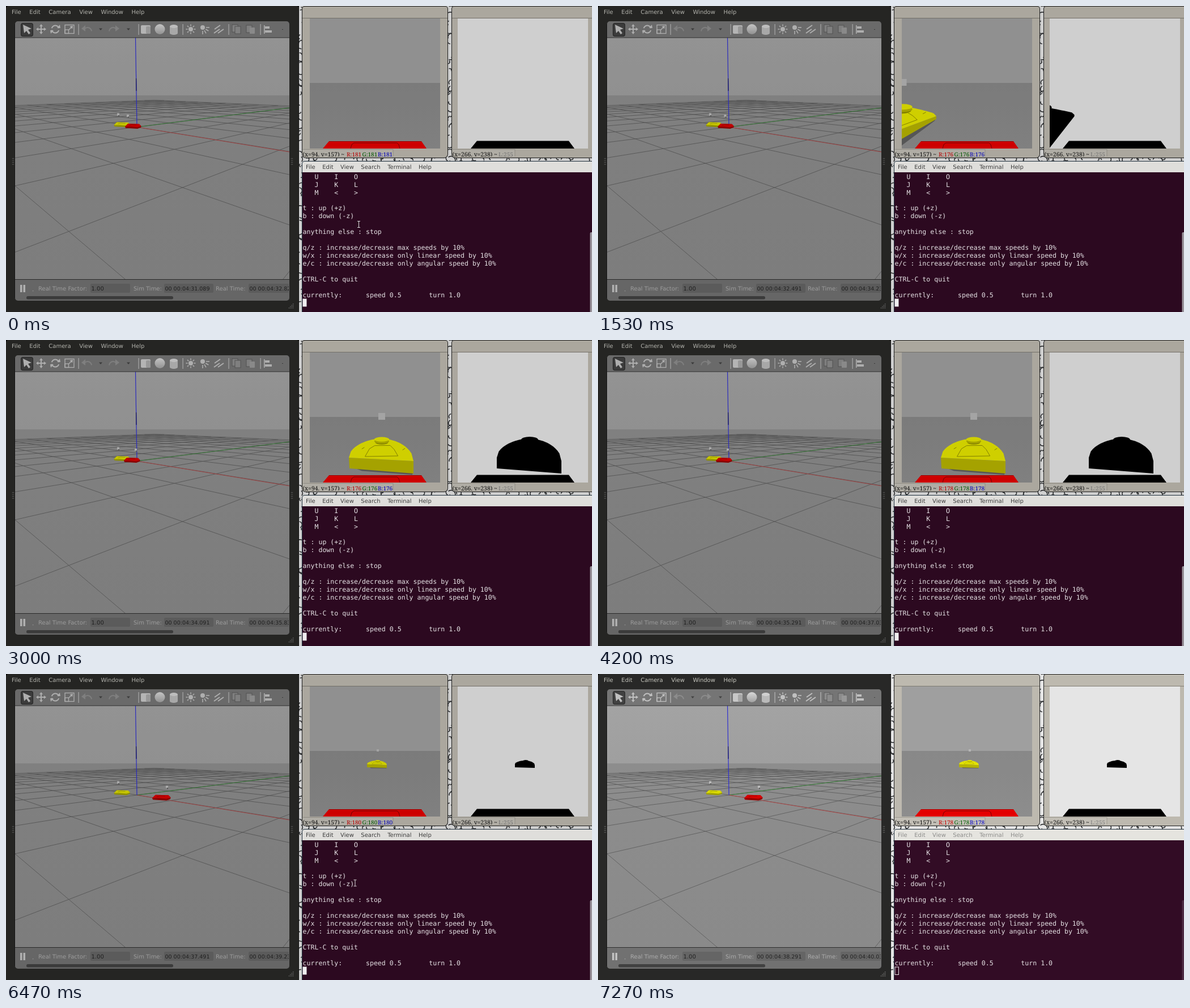
An HTML page with a canvas that plays this animation: 1034 px wide and 541 px high, repeating every 7.34 s.

```html
<!DOCTYPE html>
<html>
<head>
<meta charset="utf-8">
<style>
html, body { margin: 0; width: 100%; height: 100%; overflow: hidden; background: #000; }
canvas { display: block; }
</style>
</head>
<body>
<canvas id="stage" width="1034" height="541"></canvas>
<script>
const g = document.getElementById('stage').getContext('2d');
const LOOP = 7340, TURN_END = 2800, DRIVE_START = 4447, DRIVE_TIME = 1823, FOCUS_LOST = 6670;
const SANS = '"DejaVu Sans", sans-serif', MONO = '"DejaVu Sans Mono", monospace', SERIF = '"Noto Serif", serif';
const clamp = v => Math.max(0, Math.min(1, v));
const mix = (a, b, p) => a + (b - a) * p;
const driven = t => clamp((t - DRIVE_START) / DRIVE_TIME);

function rect(color, x, y, w, h, r = 0) {
  g.fillStyle = color;
  g.beginPath();
  g.roundRect(x, y, w, h, r);
  g.fill();
}
function trace(points) {
  g.beginPath();
  for (const [x, y] of points) g.lineTo(x, y);
}
function poly(color, points) {
  trace(points);
  g.fillStyle = color;
  g.fill();
}
function line(color, width, ...points) {
  trace(points);
  g.strokeStyle = color;
  g.lineWidth = width;
  g.stroke();
}
function disc(color, x, y, rx, ry = rx) {
  g.fillStyle = color;
  g.beginPath();
  g.ellipse(x, y, rx, ry, 0, 0, 7);
  g.fill();
}
function arc(color, width, x, y, r, a, b) {
  g.strokeStyle = color;
  g.lineWidth = width;
  g.beginPath();
  g.arc(x, y, r, a, b);
  g.stroke();
}
function frame(color, width, x, y, w, h) {
  g.strokeStyle = color;
  g.lineWidth = width;
  g.strokeRect(x, y, w, h);
}
function text(str, x, y, color, size = 10, family = SANS) {
  g.textRendering = 'geometricPrecision';
  g.font = size + 'px ' + family;
  g.fillStyle = color;
  g.fillText(str, x, y);
  return x + g.measureText(str).width;
}
function menu(items, x, y, gap, color) {
  for (const item of items.split(' ')) x = text(item, x, y, color) + gap;
}
function clipped(x, y, w, h, draw) {
  g.save();
  g.beginPath();
  g.rect(x, y, w, h);
  g.clip();
  draw();
  g.restore();
}
function shade(y0, y1, from, to) {
  const fill = g.createLinearGradient(0, y0, 0, y1);
  fill.addColorStop(0, from);
  fill.addColorStop(1, to);
  return fill;
}

function wallpaper() {
  rect('#fff', 517, 0, 517, 541);
  let seed = 7;
  const rnd = () => (seed = seed * 16807 % 2147483647) / 2147483647;
  const doodle = (x, y) => {
    const a = rnd() * 6;
    arc('#3a3c3e', 1.6, x + rnd() * 8 - 4, y + rnd() * 6 - 3, 3 + rnd() * 5, a, a + 1.5 + rnd());
  };
  for (let y = 0; y < 541; y += 9) { doodle(520, y); doodle(783, y); }
  for (let x = 524; x < 1034; x += 9) doodle(x, 271);
}

// Ground grid: two families of lines, each through its own vanishing point
const HORIZON = 147, VX = -185, VY = 761;
const kx = y => 6.21 + 1.678 * y, ky = x => -7.91 + 1.775 * x;
function ground(x, y) {
  const d = (VY - VX) / (kx(y) - ky(x));
  return [VX + d * kx(y), HORIZON + d];
}

function scene(t) {
  rect(shade(56, 158, '#b5b5b5', '#b1b1b1'), 16, 56, 484, 103);
  rect(shade(158, 483, '#9d9d9d', '#9a9a9a'), 16, 158, 484, 325);
  for (let n = -10; n <= 10; n++) {
    const maxX = Math.min(10, (13.2 + 1.678 * n) / 1.775), minY = Math.max(-10, (1.775 * n - 13.2) / 1.678);
    if (maxX > -10) line('#626262', .8, ground(-10, n), ground(maxX, n));
    if (minY < 10) line('#626262', .8, ground(n, 10), ground(n, minY));
  }
  line('#3c8c3c', 1, [231, 214], [500, 180]);
  line('#c25050', 1, [231, 214], [500, 258]);
  line('#3434e8', 1.2, [231, 214], [228.5, 56]);
  line('#1c1c70', 1.2, [230, 150], [229.6, 128]);

  post(198, 192);
  robot(204.5, 209.5, 1, '#f4f400', '#b0b000');
  const spin = clamp(t / 2270), drive = driven(t);
  post(215 + 14 * spin + 55 * drive, 194.5 + 5.5 * drive);
  robot(224 - 2 * spin + 3 * Math.sin(Math.PI * spin) + 52 * drive, 212.2 + 6 * drive, 1 + .14 * drive, '#f00000', '#a80000');
}
function post(x, y) {
  rect('#d2d2d2', x - 2, y - 2.5, 4, 4);
  rect('#6e6e6e', x, y + 1, 2, 2.5);
}
function robot(x, y, s, top, side) {
  const at = pts => pts.map(([a, b]) => [x + a * s, y + b * s]);
  const rim = [[-14, 1], [-9, -4], [11, -3.5], [14.5, 0]];
  poly(side, at([...rim, [14, 2.5], [8, 4.8], [-13, 3.5]]));
  poly(top, at([...rim, [8, 2], [-3, 1]]));
  line(side, .8, ...at([[-7, -1], [-2, -2.5], [6, -2]]));
}

function toolbar() {
  const ink = '#d6d6d6', dim = '#9c9c9c', dark = '#484848';
  rect('#828282', 16, 27, 484, 32, [5, 5, 0, 0]);
  rect('#2c2c2c', 26, 30, 22, 24, 4);
  rect(dark, 27, 31, 20, 22, 3);
  poly(ink, [[30, 33], [45, 40], [39, 42], [43, 48], [40, 50], [36, 44], [32, 48]]);

  // Move, rotate, scale
  for (let i = 0; i < 4; i++) {
    const c = [1, 0, -1, 0][i], s = [0, 1, 0, -1][i];
    line(ink, 2, [62, 41], [62 + c * 7, 41 + s * 7]);
    poly(ink, [[62 + c * 9, 41 + s * 9], [62 + c * 5 - s * 3, 41 + s * 5 + c * 3], [62 + c * 5 + s * 3, 41 + s * 5 - c * 3]]);
  }
  for (const d of [1, -1]) {
    arc(ink, 2, 87, 41, 6.5, d > 0 ? .3 : 3.4, d > 0 ? 2.9 : 6);
    poly(ink, [[87 - d * 3, 41 + d * 2], [87 - d * 9, 41 + d * 2], [87 - d * 8, 41 + d * 8]]);
  }
  frame(ink, 1.3, 104, 33.5, 16, 15);
  frame(ink, 1.3, 104, 42, 6.5, 6.5);
  line(ink, 1.5, [111, 42], [117, 36]);
  poly(ink, [[118, 35], [112.5, 36], [117, 40.5]]);

  for (const x of [128, 234, 312, 393, 449]) rect('#cfcfcf', x - .5, 32, 1.2, 19);

  // Undo and redo
  for (const [x, d] of [[142, 1], [191, -1]]) {
    arc(dim, 2, x + d * 2, 45, 7, d > 0 ? 3.9 : 3.2, d > 0 ? 6.2 : 5.5);
    poly(dim, [[x - d * 9, 40], [x - d * 2, 34], [x - d * 2, 45]]);
    poly(dark, [[x + 22, 39.5], [x + 28, 39.5], [x + 25, 43]]);
  }

  // Box, ball, cylinder
  rect('#dedede', 238, 34, 17, 15, 2);
  rect('#bbb', 247, 36, 8, 13, 2);
  disc(shade(33, 50, '#ededed', '#b4b4b4'), 271.5, 41, 9);
  rect('#cfcfcf', 289, 36, 14, 12);
  disc('#cfcfcf', 296, 48, 7, 3);
  disc('#e8e8e8', 296, 36, 7, 3);

  // Lights
  const ray = (x, y, a, r0, r1) => line(ink, 1.6,
    [x + r0 * Math.cos(a), y + r0 * Math.sin(a)], [x + r1 * Math.cos(a), y + r1 * Math.sin(a)]);
  disc(ink, 326, 41, 4);
  for (let i = 0; i < 8; i++) ray(326, 41, i * Math.PI / 4, 5.5, 8.5);
  disc(ink, 347, 38, 4);
  for (let i = 0; i < 4; i++) ray(347, 38, i * Math.PI / 6, 6, 12);
  for (const [x, y] of [[368, 41], [367, 48], [374, 48]]) line(ink, 2, [x, y], [x + 10, y - 7]);

  // Copy, paste, align
  for (const [x, y] of [[399, 33], [404, 36], [424, 34]]) {
    rect(dim, x, y, 10, 13, 1);
    frame('#666', 1, x, y, 10, 13);
  }
  rect('#a8a8a8', 430, 38, 9, 11, 1);
  rect(ink, 455, 34, 1.6, 15);
  rect(ink, 457, 36, 8, 4);
  rect(ink, 457, 43, 12, 4);
  rect(dark, 487, 41, 2, 1);
}

function simulator(t) {
  rect('#2d2d2b', 0, 0, 517, 541, [5, 5, 0, 0]);
  line('#151515', 1, [516.5, 4], [516.5, 541]);
  menu('File Edit Camera View Window Help', 10, 13.5, 14.6, '#dcdcd4');
  toolbar();
  clipped(16, 56, 484, 427, () => scene(t));
  line('#3a3a3a', 1, [16, 56], [500, 56]);

  rect('#7e7e7e', 16, 484, 484, 37, [0, 0, 5, 5]);
  line('#333', 1, [16, 483.5], [500, 483.5]);
  line('#1a1a1a', 1, [15.5, 32], [15.5, 516]);
  rect('#d8d8d8', 25, 493, 3.5, 13);
  rect('#d8d8d8', 30.5, 493, 3.5, 13);
  rect('#c0c0c0', 47, 503, 1.2, 1.2);
  const step = Math.floor(t / 200), now = 31.089 + step * .2 + (step ? .002 : 0);
  const clock = s => '00 00:04:' + s.toFixed(3);
  const field = (label, x, value, boxX, boxW, size) => {
    text(label, x, 503, '#c0c0c0');
    rect('#707070', boxX, 491, boxW, 16, 2);
    clipped(boxX, 491, boxW, 16, () => text(value, boxX + 1.5, 503, '#262626', size));
  };
  field('Real Time Factor:', 57, '1.00', 149, 70, 10);
  field('Sim Time:', 225, clock(now), 279, 87, 9.5);
  field('Real Time:', 370, clock(now + 1.74), 428, 71, 9.5);
  rect('#484848', 36, 513, 259, 5.5, 2.5);

  // Splitter handles and resize grip
  for (let i = 0; i < 4; i++) {
    for (const x of [11, 13, 503, 505]) rect('#8a8a8a', x, 269 + i * 3.4, 1, 1.2);
    for (let j = 0; j <= i; j++) rect('#8a8a8a', 506 - j * 2.4, 526 + i * 2.4, 1.3, 1.3);
  }
}

// Yellow robot as the camera sees it:
// left, right, top, edge left/right, bottom left/right, lid x, post size
const NEAR = [605, 719, 174.5, 208, 214, 227, 236, 663, 12];
const FAR = [637, 672, 153, 159.5, 161, 165, 166, 656, 4];
const TURN = [-62, -51, 1, 16, -8, 22, -15, -52, 0];
function pose(t) {
  const turn = Math.max(0, (TURN_END - t) / 530);
  // Apparent width shrinks as one over the distance
  const width = 1 / mix(1 / 114, 1 / 35, driven(t)), near = (width - 35) / 79;
  return NEAR.map((v, i) => mix(FAR[i], v, near) + TURN[i] * turn);
}
function yellow(t, solid) {
  const [l, r, top, el, er, bl, br, lid, size] = pose(t), w = r - l;
  const dome = [];
  for (let i = 0; i <= 32; i++) {
    const u = i / 32, e = mix(el, er, u);
    dome.push([l + w * u, e - (e - top) * Math.pow(Math.sin(Math.PI * u), .47)]);
  }
  const lidY = top + w * .015;
  if (solid) {
    poly('#000', [...dome, [r, br], [l, bl + Math.max(0, bl - br)]]);
    disc('#000', lid, lidY, w * .13, w * .045);
    return;
  }
  const at = (u, v) => [l + w * u, mix(mix(el, er, u), top, v)];
  const seam = '#a09c00', thin = Math.min(1, w / 80);
  rect('#cacaca', lid - size / 2, 135 - size / 2, size, size);
  poly('#6a6a6a', [[l + w * .06, bl - 2], [r, br - 3], [r - w * .02, br + w * .02], [l + w * .2, bl + w * .04]]);
  poly('#cbc700', [[l, el], [r, er], [r, br], [l + w * .01, bl]]);
  poly('#ffff00', dome);
  line(seam, thin, at(.25, .1), at(.32, .5), at(.4, .66), at(.64, .68), at(.7, .5), at(.76, .2), at(.25, .1));
  for (const u of [.2, .83]) line(seam, thin, at(u, .48), at(u + .04, .56));
  disc(seam, lid, lidY + w * .045, w * .1, w * .03);
  disc('#cbc700', lid, lidY + w * .025, w * .115, w * .035);
  disc('#ffff00', lid, lidY - w * .005, w * .115, w * .036);
}

function viewer(x, w) {
  rect('#232323', x - 1, 0, w + 2, 269, [5, 5, 7, 7]);
  rect('#d2cec3', x, 1, w, 267, [4, 4, 6, 6]);
  line('#8e8a80', 1, [x, 21.5], [x + w, 21.5]);
}
function status(x, str, end) {
  rect('#d9d5cb', x, 253, end - x, 13);
  line('#b0aca2', 1, [x, 253.5], [end, 253.5], [end, 266]);
  text(str, x, 266, '#111', 10.4, SERIF);
}
function cameras(t) {
  viewer(523, 256);
  viewer(787, 260);
  clipped(536, 22, 230, 230, () => {
    rect('#b1b1b1', 536, 22, 230, 115);
    rect(shade(136, 252, '#979797', '#9d9d9d'), 536, 136, 230, 116);
    yellow(t);
    poly('#fe0000', [[559, 252], [570, 239], [733, 239], [742, 252]]);
    line('#8c0000', 1, [608, 252], [610, 245], [614, 242], [690, 242], [693, 245], [695, 252]);
    line('#c00000', 1, [570, 239.5], [733, 239.5]);
  });
  clipped(797, 22, 230, 230, () => {
    rect('#fff', 797, 22, 230, 230);
    g.save();
    g.translate(261, 0);
    yellow(t - 180, true);
    g.restore();
    poly('#000', [[820, 252], [831, 238.5], [993, 238.5], [1003, 252]]);
  });
  const level = Math.round(178.6 + 3.1 * Math.sin(1 + 2.335 * Math.floor(t / 200)));
  clipped(523, 252, 511, 14, () => {
    status(523.5, '(x=94, y=157) ~', 683);
    ['#e00000', '#006a00', '#0000e0'].forEach((c, i) => text('RGB'[i] + ':' + level, 601 + i * 27.5, 266, c, 10, SERIF));
    status(787.5, '(x=266, y=238) ~', 898);
    text('L:255', 869, 266, '#8c8c8c', 10, SERIF);
  });
}

const LINES = `   U    I    O
   J    K    L
   M    <    >

t : up (+z)
b : down (-z)

anything else : stop

q/z : increase/decrease max speeds by 10%
w/x : increase/decrease only linear speed by 10%
e/c : increase/decrease only angular speed by 10%

CTRL-C to quit

currently:      speed 0.5       turn 1.0`.split('\n');

function terminal(t, fade) {
  const focused = t < FOCUS_LOST, ink = '#e6e2e5';
  const tone = (a, b) => `rgb(${a.map((v, i) => Math.round(mix(v, b[i], fade)))})`;
  rect('#20303e', 522, 274, 520, 275, [5, 0, 0, 0]);
  rect(tone([223, 222, 219], [229, 228, 223]), 523, 275, 511, 19, [4, 0, 0, 0]);
  menu('File Edit View Search Terminal Help', 529, 288, 12.5, focused ? '#3c3c3c' : '#8c8c8a');
  rect(tone([44, 9, 32], [50, 12, 37]), 523, 294, 511, 247);
  LINES.forEach((s, i) => text(s, 523.6, 305.6 + i * 13.96, ink, 11.57, MONO));
  const blinkedOff = t > 780 && (t - 780) % 1170 < 300;
  if (!focused) frame(ink, 1, 524, 518, 6.5, 13.5);
  else if (!blinkedOff) rect('#f0eef0', 523.5, 517.5, 7, 14);
  rect(focused ? '#98929a' : '#4c2c44', 1030.5, 400, 3.5, 141, [2, 0, 0, 0]);
  if (t < 400) pointer(622, 386);
  if (t >= 6270 && focused) pointer(615.5, 369.5);
}
function pointer(x, y) {
  line('#ddd', 1, [x + .5, y - 5], [x + .5, y + 5]);
  for (const dy of [-5.5, 5.5]) line('#ddd', 1, [x - 2, y + dy], [x + 3, y + dy]);
}

function draw() {
  const t = performance.now() % LOOP;
  const p = clamp((t - FOCUS_LOST) / 600), fade = 1 - (1 - p) * (1 - p);
  wallpaper();
  simulator(t);
  cameras(t);
  // Everything behind the terminal is dimmed
  rect(`rgba(0,0,0,${mix(.19, .1, fade)})`, 0, 0, 1034, 541);
  terminal(t, fade);
  requestAnimationFrame(draw);
}
draw();
</script>
</body>
</html>
```
